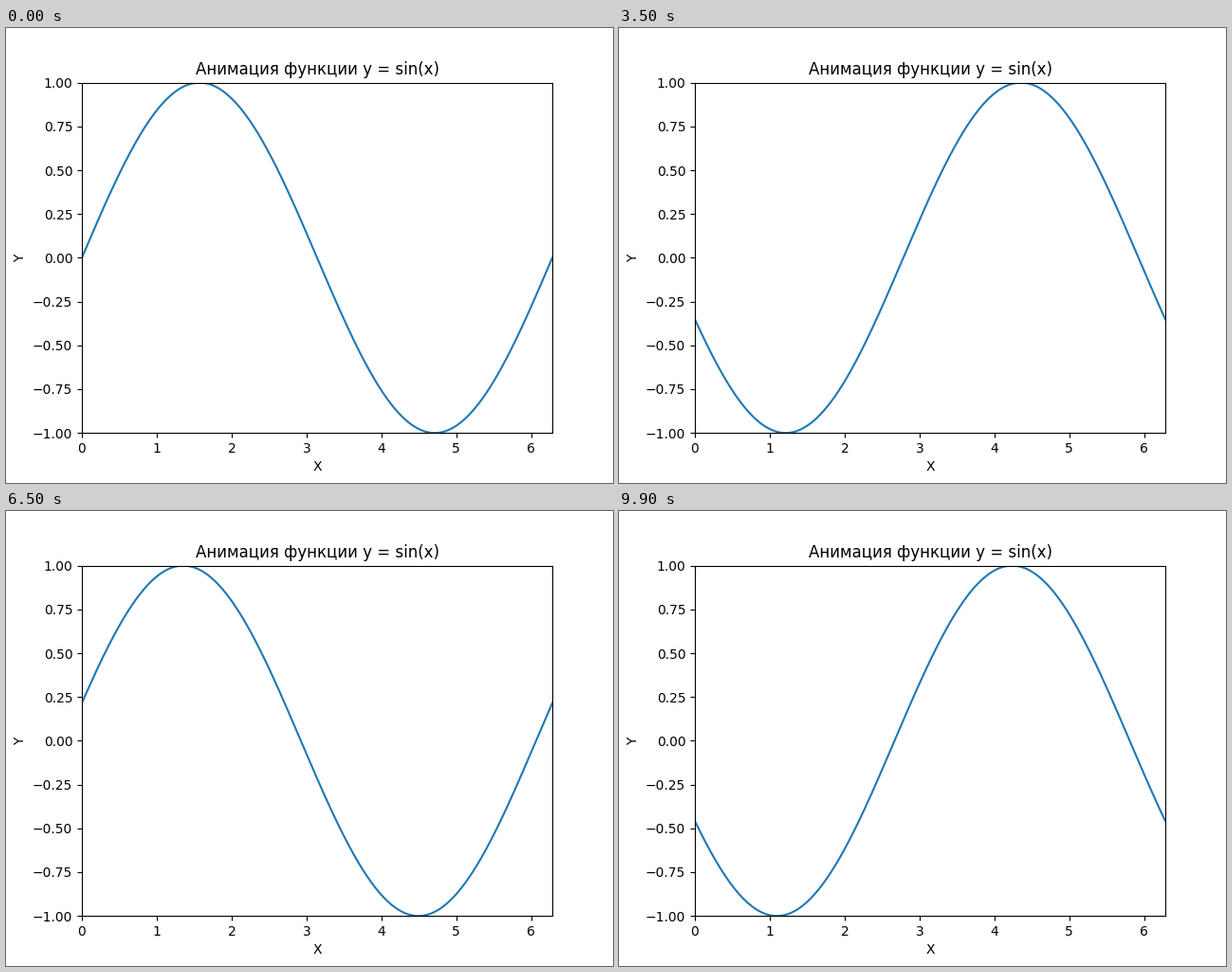
Write a matplotlib script that moves like this. It is 640 px wide and 480 px high and loops after 10000 ms.

```python
import numpy as np
import matplotlib.pyplot as plt
from matplotlib.animation import FuncAnimation

FRAMES = 100
INTERVAL = 100  # ms

fig, ax = plt.subplots(figsize=(6.4, 4.8), dpi=100)
x = np.linspace(0, 2 * np.pi, 1000)
line, = ax.plot(x, np.sin(x))

ax.set_xlim(0, 2 * np.pi)
ax.set_ylim(-1, 1)
ax.set_title("Анимация функции y = sin(x)")
ax.set_xlabel("X")
ax.set_ylabel("Y")


def update(i):
    line.set_ydata(np.sin(x + i / 10))
    return line,


ani = FuncAnimation(fig, update, frames=FRAMES, interval=INTERVAL,
                    repeat=True, repeat_delay=0)
plt.show()
```
